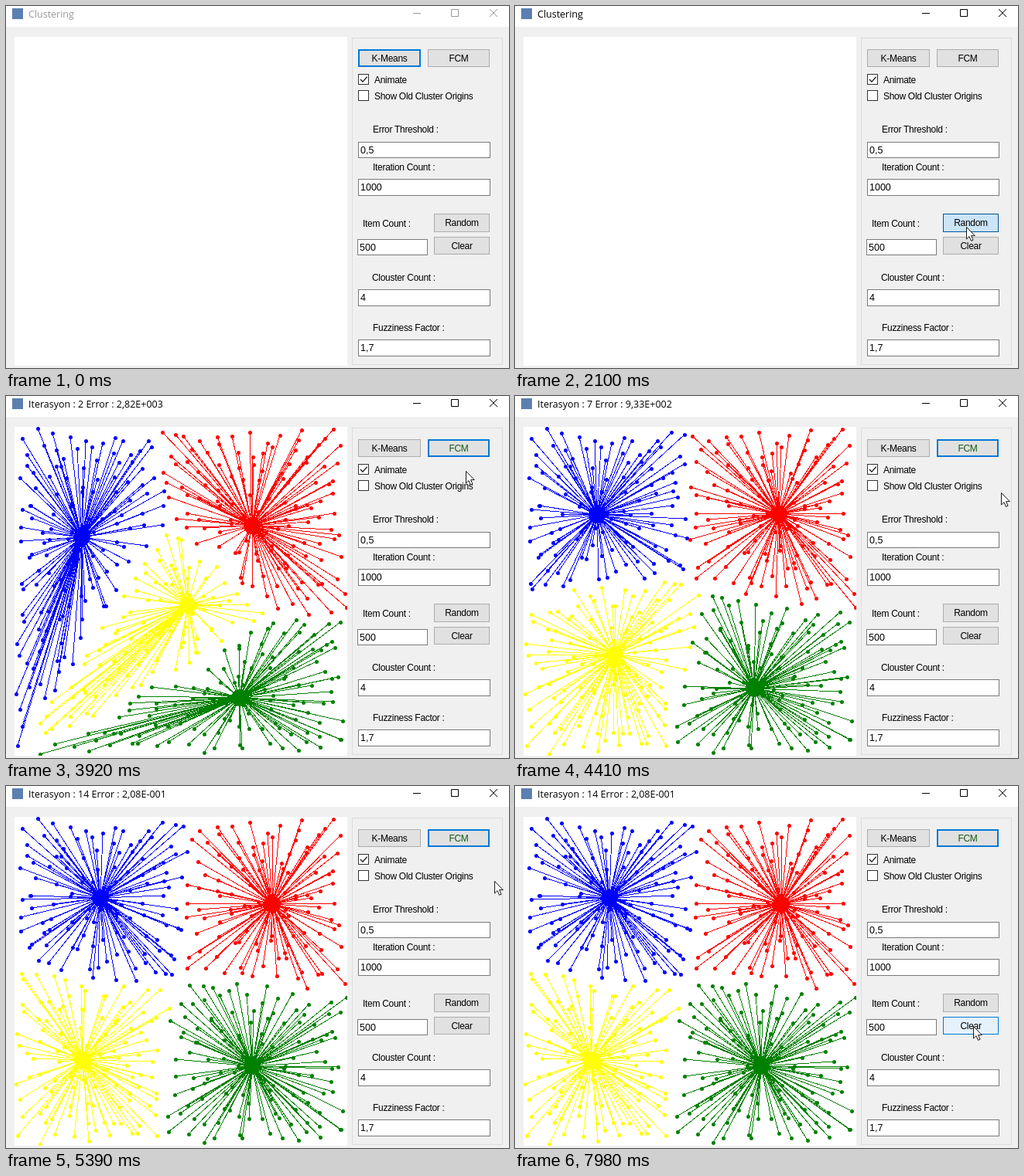
An HTML page for the animation above (8000 ms loop, 650x469 px).

```html
<!DOCTYPE html>
<html lang="en">
<head>
<meta charset="utf-8">
<title>Clustering</title>
<style>
  html, body { margin: 0; width: 100%; height: 100%; overflow: hidden; background: #f0f0f0; }
  svg { display: block; }
  text { font: 12px "Liberation Sans", Arial, sans-serif; letter-spacing: -.3px; white-space: pre; }
  text.value { font-size: 12.5px; letter-spacing: 0; }
  text.title { font: 12.5px "Open Sans", "Noto Sans", sans-serif; letter-spacing: 0; }
</style>
</head>
<body>
<svg id="stage" width="650" height="469" viewBox="0 0 650 469">
  <defs><clipPath id="board"><rect x="11" y="40" width="430" height="426"/></clipPath></defs>
  <rect width="650" height="469" fill="#f0f0f0"/>
  <rect width="650" height="27" fill="#fff"/>
  <rect x="8" y="3" width="14" height="14" fill="#5b7fb0"/>
  <rect x="11" y="40" width="430" height="426" fill="#fff"/>
  <rect x="447.5" y="41.5" width="194" height="423" fill="none" stroke="#dcdcdc"/>
</svg>
<script>
const LOOP = 8000, TICK = 70;
const ACTIVATE = 2030, SCATTER = 2240, PRESS = 3570, RUN = 3640;
const LAST_STEP = 14;
const stage = document.getElementById("stage");

function add(tag, attrs, parent = stage) {
  const el = document.createElementNS("http://www.w3.org/2000/svg", tag);
  set(el, attrs);
  return parent.appendChild(el);
}
function set(el, attrs) {
  for (const key in attrs) el.setAttribute(key, attrs[key]);
}
function label(text, x, y, attrs = {}) {
  const el = add("text", { x, y, ...attrs });
  el.textContent = text;
  return el;
}

// ---- window chrome and side panel ----
const title = label("Clustering", 29, 15, { class: "title" });
const chrome = add("path", {
  d: "M526 9.5H536M575.5 4.5H584.5V13.5H575.5ZM625 4L635 14M635 4L625 14",
  fill: "none"
});

function button(text, x, y, w, h) {
  const box = add("rect", {});
  const caption = label(text, x + w / 2, Math.round(y + h / 2) + 4, { "text-anchor": "middle" });
  return { box, caption, x, y, w, h };
}
const looks = {
  normal: ["#e1e1e1", "#adadad", 1],
  focus: ["#e1e1e1", "#0078d7", 2],
  hover: ["#e5f1fb", "#0078d7", 1],
  down: ["#cce4f7", "#005499", 1]
};
function paint(b, state) {
  const [fill, stroke, line] = looks[state];
  set(b.box, {
    x: b.x + line / 2, y: b.y + line / 2, width: b.w - line, height: b.h - line,
    fill, stroke, "stroke-width": line
  });
}
const kMeans = button("K-Means", 455, 56, 81, 23);
const fcm = button("FCM", 545, 56, 80, 23);
const random = button("Random", 553, 269, 72, 24);
const clear = button("Clear", 553, 299, 72, 23);
const buttons = [kMeans, fcm, random, clear];

function checkbox(text, y, checked) {
  add("rect", { x: 455.5, y: y + .5, width: 13, height: 13, fill: "#fff", stroke: "#333" });
  if (checked) {
    add("path", { d: `M458 ${y + 7}l3 3.2l5.6 -6.4`, fill: "none", stroke: "#222", "stroke-width": 1.3 });
  }
  label(text, 476, y + 12);
}
checkbox("Animate", 88, true);
checkbox("Show Old Cluster Origins", 109, false);

function field(text, x, y, w = 171, h = 22) {
  add("rect", { x: x + .5, y: y + .5, width: w - 1, height: h - 1, fill: "#fff", stroke: "#7a7a7a" });
  label(text, x + 3, y + 15, { class: "value" });
}
label("Error Threshold :", 474, 164);
field("0,5", 455, 176, 171, 21);
label("Iteration Count :", 474, 213);
field("1000", 455, 224);
label("Item Count :", 461, 286);
field("500", 454, 302, 91, 21);
label("Clouster Count :", 473, 356);
field("4", 455, 367);
label("Fuzziness Factor :", 474, 421);
field("1,7", 455, 432);

// ---- data points: one at a random place in each cell of a grid ----
let seed = 20177;
function rand() {
  seed = (seed * 48271) % 2147483647;
  return seed / 2147483647;
}
const COLS = 22, ROWS = 21;
const points = Array.from({ length: COLS * ROWS }, (_, i) => [
  Math.round(12 + (i % COLS + rand()) * 428 / COLS),
  Math.round(41 + (Math.floor(i / COLS) + rand()) * 424 / ROWS)
]);

// ---- clusters: centre early, midway and settled ----
const clusters = [
  ["#00f", [98, 183], [106, 154], [122, 145]],
  ["#f00", [318, 168], [341, 153], [344, 153]],
  ["#ff0", [235, 271], [129, 335], [99, 355]],
  ["#008000", [302, 391], [309, 379], [318, 363]]
].map(([color, early, mid, settled]) => ({
  color, path: [[2, ...early], [7, ...mid], [11, ...settled]]
}));

const board = add("g", { "clip-path": "url(#board)" });
const dotStyle = { fill: "none", "stroke-width": 5, "stroke-linecap": "round" };
const dots = list => list.map(([x, y]) => `M${x + .5} ${y + .5}h.01`).join("");
const loose = add("path", { ...dotStyle, stroke: "#000", d: dots(points) }, board);
const result = add("g", {}, board);
for (const c of clusters) {
  c.lines = add("path", { fill: "none", stroke: c.color, "shape-rendering": "crispEdges" }, result);
  c.dots = add("path", { ...dotStyle, stroke: c.color }, result);
  c.hub = add("circle", { r: 11, fill: c.color }, result);
}

// Values along keys [at, ...values], held at both ends.
function track(keys, at, ease = f => f) {
  let i = 0;
  while (i < keys.length - 2 && at >= keys[i + 1][0]) i++;
  const [a, b] = [keys[i], keys[i + 1]];
  const f = ease(Math.min(1, Math.max(0, (at - a[0]) / (b[0] - a[0]))));
  return a.slice(1).map((v, k) => v + (b[k + 1] - v) * f);
}

function drawClusters(step) {
  for (const c of clusters) {
    c.center = track(c.path, step).map(Math.round);
    c.members = [];
  }
  for (const p of points) {
    const away = c => Math.hypot(p[0] - c.center[0], p[1] - c.center[1]);
    clusters.reduce((a, b) => away(b) < away(a) ? b : a).members.push(p);
  }
  for (const c of clusters) {
    const [cx, cy] = c.center;
    set(c.lines, { d: c.members.map(([x, y]) => `M${cx} ${cy}L${x} ${y}`).join("") });
    set(c.dots, { d: dots(c.members) });
    set(c.hub, { cx, cy });
  }
}

// The error shrinks geometrically between these [step, value] keys.
const errorPath = [[2, 2820], [7, 933], [11, 5.97], [14, .208]]
  .map(([step, value]) => [step, Math.log10(value)]);
function errorText(step) {
  const [digits, power] = (10 ** track(errorPath, step)[0]).toExponential(2).split("e");
  return digits.replace(".", ",") + "E" + power[0] + power.slice(1).padStart(3, "0");
}

// ---- timeline ----
function stepAt(t) {
  return t < RUN ? 0 : Math.min(LAST_STEP, Math.max(1, Math.floor((t - 3728) / 96)));
}
const pointerPath = [
  [210, 600, 480], [1050, 583, 286], [2380, 583, 286], [2870, 581, 67], [3500, 580, 64],
  [PRESS, 580, 64], [3920, 594, 97], [4410, 628, 125], [5250, 630, 124], [6720, 633, 119],
  [6790, 638, 117], [7000, 638, 117], [7980, 592, 311]
];
const easeOut = f => 1 - (1 - f) ** 2;
const pointer = add("path", {
  d: "M.5 .5V16L4 12.6L6.5 18.3L9 17.2L6.6 11.6H11.3Z", fill: "#fff", stroke: "#000", "stroke-width": .9
});

const inside = (b, [x, y]) => x >= b.x && x < b.x + b.w && y >= b.y && y < b.y + b.h;
const show = (el, on) => { el.style.display = on ? "" : "none"; };
let shown = -1;

function draw(time) {
  const t = Math.floor(time / TICK) * TICK;
  const active = t >= ACTIVATE;
  const ink = active ? "#000" : "#999";
  const step = stepAt(t);
  const tip = track(pointerPath, t, easeOut).map(Math.round);

  if (step !== shown) {
    if (step) drawClusters(step);
    title.textContent = step ? `Iterasyon : ${step} Error : ${errorText(step)}` : "Clustering";
    shown = step;
  }
  show(loose, t >= SCATTER && !step);
  show(result, step);
  set(title, { fill: ink });
  set(chrome, { stroke: ink });
  set(fcm.caption, { fill: step ? "#145a14" : "#000" });
  set(pointer, { transform: `translate(${tip})` });

  const focused = !active ? kMeans : t < PRESS ? random : fcm;
  const pressed = active && t < SCATTER ? random : t >= PRESS && t < RUN ? fcm : null;
  for (const b of buttons) {
    paint(b, b === pressed ? "down" : inside(b, tip) ? "hover" : b === focused ? "focus" : "normal");
  }
}

const start = performance.now();
function frame() {
  draw((performance.now() - start) % LOOP);
  requestAnimationFrame(frame);
}
frame();
</script>
</body>
</html>
```
